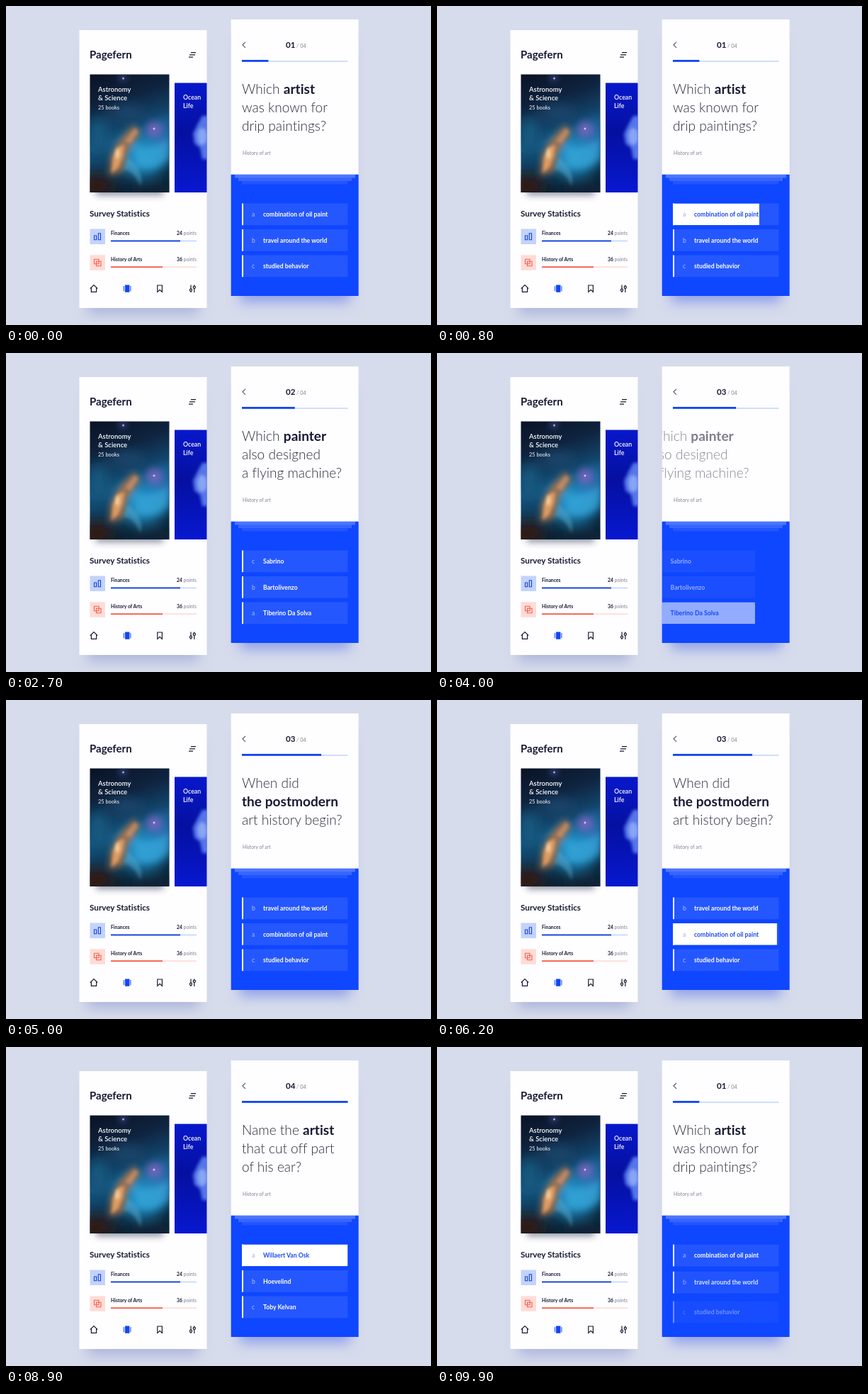
Animation, 600 px wide and 450 px high, one loop 10000 ms. Source, as an HTML page:

```html
<!DOCTYPE html>
<html lang="en">
<head>
<meta charset="utf-8">
<title>Quiz app</title>
<style>
  html, body { margin: 0; width: 100%; height: 100%; overflow: hidden; background: #d7dcec; }
  body > svg { display: block; width: 100%; height: 100%; }
  text { font-family: Lato, "Open Sans", sans-serif; fill: #171b33; white-space: pre; font-variant-ligatures: none; }
  .semi { font-weight: 600; }
  .bold { font-weight: 700; }
  .white { fill: #fff; }
  .grey { fill: #81838f; font-weight: 400; }
  .small { font-size: 6.8px; }
  .ask { font-size: 19.1px; font-weight: 300; fill: #2b2e3d; }
  .answer { font-size: 8.7px; }
  .icon { fill: none; stroke: #171b33; stroke-width: 1.2; }
</style>
</head>
<body>
<svg viewBox="0 0 600 450">
  <defs>
    <filter id="blur" x="-30%" y="-30%" width="160%" height="160%"><feGaussianBlur stdDeviation="9"/></filter>
    <filter id="soft" x="-60%" y="-60%" width="220%" height="220%"><feGaussianBlur stdDeviation="5"/></filter>
    <filter id="fine" x="-60%" y="-60%" width="220%" height="220%"><feGaussianBlur stdDeviation="2.2"/></filter>
    <filter id="mist" x="-60%" y="-60%" width="220%" height="220%"><feGaussianBlur stdDeviation="9"/></filter>
    <linearGradient id="sky" x2=".25" y2="1">
      <stop stop-color="#0a1224"/><stop offset=".3" stop-color="#0f2440"/>
      <stop offset=".6" stop-color="#14507a"/><stop offset="1" stop-color="#0c2436"/>
    </linearGradient>
    <linearGradient id="sea" x2="0" y2="1">
      <stop stop-color="#0718cc"/><stop offset=".45" stop-color="#0510a0"/><stop offset="1" stop-color="#0718d0"/>
    </linearGradient>
    <clipPath id="card"><path d="M118.500 96.500h112v166.500h-112z"/></clipPath>
    <clipPath id="side"><path d="M238 108.500h45.500v154.500H238z"/></clipPath>
    <clipPath id="phone"><path d="M317.700 19h180v390h-180z"/></clipPath>
  </defs>

  <rect width="600" height="450" fill="#d7dcec"/>
  <g filter="url(#blur)">
    <rect x="115" y="60" width="157" height="375" fill="#8b98cc" opacity=".55"/>
    <rect x="330" y="50" width="156" height="368" fill="#5470e8" opacity=".55"/>
  </g>

  <rect x="103.500" y="34" width="180" height="392" fill="#fefdff"/>
  <text x="118" y="73.500" class="bold" font-size="15">Pagefern</text>
  <path class="icon" d="M261 65.700h7M259 68.900h8M258 72.100h6"/>

  <rect x="127" y="230" width="95" height="37" fill="#26324a" opacity=".5" filter="url(#soft)"/>
  <g clip-path="url(#card)">
    <rect x="118" y="96" width="113" height="168" fill="url(#sky)"/>
    <g filter="url(#mist)">
      <ellipse cx="192" cy="210" rx="38" ry="30" fill="#2193cd" opacity=".85"/>
      <ellipse cx="222" cy="185" rx="18" ry="24" fill="#2a74b8" opacity=".8"/>
      <ellipse cx="130" cy="182" rx="14" ry="26" fill="#155a80"/>
      <ellipse cx="170" cy="150" rx="26" ry="9" fill="#1d4a70"/>
      <ellipse cx="127" cy="254" rx="24" ry="15" fill="#33190f"/>
      <ellipse cx="205" cy="260" rx="30" ry="11" fill="#0b2338"/>
    </g>
    <g filter="url(#soft)">
      <path d="M146 240L148 212L160 190L180 168L190 178L172 204L166 232Z" fill="#b5703f" opacity=".85"/>
      <path d="M180 196Q205 206 230 186V214Q210 236 182 226Z" fill="#3fb0e2" opacity=".6"/>
      <circle cx="209" cy="174" r="11" fill="#8f66c8" opacity=".65"/>
      <circle cx="165" cy="101" r="5" fill="#5760b0" opacity=".7"/>
    </g>
    <g filter="url(#fine)">
      <path d="M149 236L151 214L157 199L167 196L165 212L158 228Z" fill="#e9a566" opacity=".85"/>
      <path d="M168 190L182 172L187 177L176 194Z" fill="#d59a72" opacity=".6"/>
      <ellipse cx="157" cy="208" rx="3" ry="7" fill="#ffe0b0" opacity=".8"/>
      <path d="M172 214Q196 232 190 254Q180 232 166 230Z" fill="#5fb4d8" opacity=".4"/>
    </g>
    <circle cx="165.500" cy="102" r="1.500" fill="#9ba9ed"/>
    <circle cx="209" cy="173" r="1.500" fill="#d9bcf6"/>
  </g>
  <g class="semi" font-size="9.500">
    <text x="130" y="121" class="white">Astronomy</text>
    <text x="130" y="132.500" class="white">&amp; Science</text>
    <text x="130" y="146" class="white" font-size="7.400" font-weight="400">25 books</text>
  </g>
  <g clip-path="url(#side)">
    <rect x="238" y="108" width="46" height="155" fill="url(#sea)"/>
    <path d="M277 155L270 168L264 180L266 194L274 200L277 216H290V155Z" fill="#6f97ff" opacity=".75" filter="url(#fine)"/>
    <ellipse cx="277" cy="184" rx="7" ry="12" fill="#b4ccff" opacity=".55" filter="url(#fine)"/>
  </g>
  <g class="semi" font-size="8.800">
    <text x="250" y="132" class="white">Ocean</text>
    <text x="250" y="144" class="white">Life</text>
  </g>

  <text x="118" y="297" class="bold" font-size="11.700">Survey Statistics</text>
  <g id="stats"></g>
  <path class="icon" d="M118.800 398.600L124 393.600L129.200 398.600M120.400 397.500V403.400H127.600V397.500"/>
  <path d="M168 393.500h6.400v10.300H168zM166 395h1v7.300h-1zM175.400 395h1v7.300h-1z" fill="#1146f4"/>
  <path class="icon" d="M213.800 394h6.600v9.400l-3.300-3-3.300 3z"/>
  <path class="icon" d="M261 393.500v5.500M261 402.500v1.500M265.800 393.500v1.500M265.800 398.500v5.500"/>
  <g class="icon"><circle cx="261" cy="400.700" r="1.600"/><circle cx="265.800" cy="396.700" r="1.600"/></g>

  <rect x="317.700" y="19" width="180" height="219" fill="#fefdff"/>
  <rect x="317.700" y="237.700" width="180" height="171.300" fill="#0f46ff"/>
  <g fill="#fff">
    <rect x="323" y="238" width="170" height="4.500" opacity=".26"/>
    <rect x="328" y="242.500" width="160" height="4.500" opacity=".17"/>
    <rect x="333" y="247" width="149.500" height="4.500" opacity=".08"/>
  </g>
  <path class="icon" d="M338 50.800L334 54.800L338 58.800" style="stroke:#565a6c"/>
  <text x="395" y="58.500" class="bold" font-size="11.600" id="count"></text>
  <text x="410" y="58.500" class="grey" font-size="7.300">/ 04</text>
  <rect x="333" y="77.300" width="149.500" height="1.400" fill="#b9d4fb"/>
  <rect x="333" y="76" height="2.800" fill="#0f46f5" id="bar"/>
  <text x="334" y="210" class="grey" font-size="6.800">History of art</text>
  <g clip-path="url(#phone)" id="quiz"></g>
</svg>

<script>
const $ = id => document.getElementById(id);
const LEFT = 333, WIDTH = 149.5, ROW = 30.7, LOOP = 10000;
const EXITS = [1130, 3680, 6400, 9000];
const LEVELS = [.25, .5, .75, 1, .25];
const OUT = 420, IN = 400, PICK = 510, FILL = 420;

const quiz = [
  { ask: ['Which *artist*', 'was known for', 'drip paintings?'],
    rows: ['a combination of oil paint', 'b travel around the world', 'c studied behavior'] },
  { ask: ['Which *painter*', 'also designed', 'a flying machine?'],
    rows: ['c Sabrino', 'b Bartolivenzo', 'a Tiberino Da Solva'] },
  { ask: ['When did', '*the postmodern*', 'art history begin?'],
    rows: ['b travel around the world', 'a combination of oil paint', 'c studied behavior'] },
  { ask: ['Name the *artist*', 'that cut off part', 'of his ear?'],
    rows: ['a Willaert Van Osk', 'b Hoevelind', 'c Toby Kelvan'] }
];

const clamp = x => Math.min(1, Math.max(0, x));
const easeOut = x => 1 - (1 - clamp(x)) ** 3;
const easeIn = x => clamp(x) ** 3;
const easeBoth = x => (x = clamp(x)) < .5 ? 4 * x ** 3 : 1 - 4 * (1 - x) ** 3;

function stat(y, name, points, end, [dark, pale, track], icon) {
  return `<rect x="118.500" y="${y}" width="21.500" height="21.500" fill="${pale}"/>
    <path d="${icon}" transform="translate(118.500 ${y})" fill="none" stroke="${dark}" stroke-width="1.100"/>
    <text x="148" y="${y + 8.6}" class="bold small">${name}</text>
    <text x="269" y="${y + 8.6}" class="small" text-anchor="end"><tspan class="bold">${points}</tspan><tspan class="grey"> points</tspan></text>
    <rect x="148" y="${y + 16.2}" width="121" height="1.500" fill="${track}"/>
    <rect x="148" y="${y + 16}" width="${end - 148}" height="1.900" fill="${dark}"/>`;
}
$('stats').innerHTML =
  stat(314.5, 'Finances', 24, 246, ['#1742dc', '#c3d3fb', '#bdd5fa'], 'M6 9.500h3.200v5.800H6zM11.800 6.300H15v9h-3.200z') +
  stat(351.3, 'History of Arts', 36, 221, ['#f4604d', '#ffdcd7', '#ffd9d4'], 'M6 6h6.500v6.500H6zM9 9h6.500v6.500H9z');

function label(row, ink, letterInk) {
  return `<text x="14" y="18.600" class="answer" fill-opacity=".75" style="fill:${letterInk}">${row[0]}</text>
    <text x="30" y="18.600" class="answer bold" style="fill:${ink}">${row.slice(2)}</text>`;
}

// The nested svg clips the white, picked look of a row to its current width.
function answer(row, i) {
  return `<g class="row"><g transform="translate(${LEFT} ${278.5 + 36.5 * i})">
    <rect width="${WIDTH}" height="${ROW}" fill="#fff" opacity=".09"/>
    <rect width="2" height="${ROW}" fill="#fff"/>${label(row, '#fff', '#dbe3ff')}
    ${row[0] === 'a' ? `<svg class="pick" width="0" height="${ROW}"><rect width="${WIDTH}" height="${ROW}" fill="#fff"/>
      ${label(row, '#1c4bf2', '#7f8ed6')}</svg>` : ''}</g></g>`;
}

function line(text, i) {
  const rich = text.replace(/\*(.+)\*/, '<tspan class="bold" fill="#171b33">$1</tspan>');
  return `<text x="${LEFT}" y="${123.5 + 26 * i}" class="ask">${rich}</text>`;
}

$('quiz').innerHTML = quiz.map(q =>
  `<g><g class="head">${q.ask.map(line).join('')}</g>${q.rows.map(answer).join('')}</g>`).join('');

const pages = [...$('quiz').children].map(el => ({
  el, head: el.querySelector('.head'), rows: [...el.querySelectorAll('.row')], pick: el.querySelector('.pick')
}));

function place(el, x, y, alpha) {
  el.setAttribute('transform', `translate(${x} ${y})`);
  el.setAttribute('opacity', alpha);
}

function draw(t) {
  const passed = EXITS.filter(e => t >= e).length;
  const shown = EXITS.filter(e => t >= e + OUT).length;
  const from = LEVELS[Math.max(0, passed - 1)];
  const moved = passed ? easeBoth((t - EXITS[passed - 1]) / 700) : 1;
  $('bar').setAttribute('width', WIDTH * (from + (LEVELS[passed] - from) * moved));
  $('count').textContent = '0' + (passed % 4 + 1);

  const page = pages[shown % 4];
  pages.forEach(p => p.el.style.display = p === page ? '' : 'none');
  const exit = shown < 4 ? EXITS[shown] : Infinity;
  const enter = shown ? easeOut((t - EXITS[shown - 1] - OUT) / IN) : 1;
  const leave = easeIn((t - exit) / OUT);
  const x = 38 * (1 - enter) - 75 * leave, alpha = enter * (1 - leave);

  place(page.head, x, 0, alpha);
  page.rows.forEach((row, i) => {
    if (shown < 4) return place(row, x, 0, alpha);
    const rise = easeOut((t - 9667 - 93 * i) / 300);
    place(row, 0, 12 * (1 - rise), rise);
  });
  page.pick.setAttribute('width', WIDTH * easeOut((t - exit + PICK) / FILL));
}

const start = performance.now();
function tick() {
  draw((performance.now() - start) % LOOP);
  requestAnimationFrame(tick);
}
tick();
</script>
</body>
</html>
```
